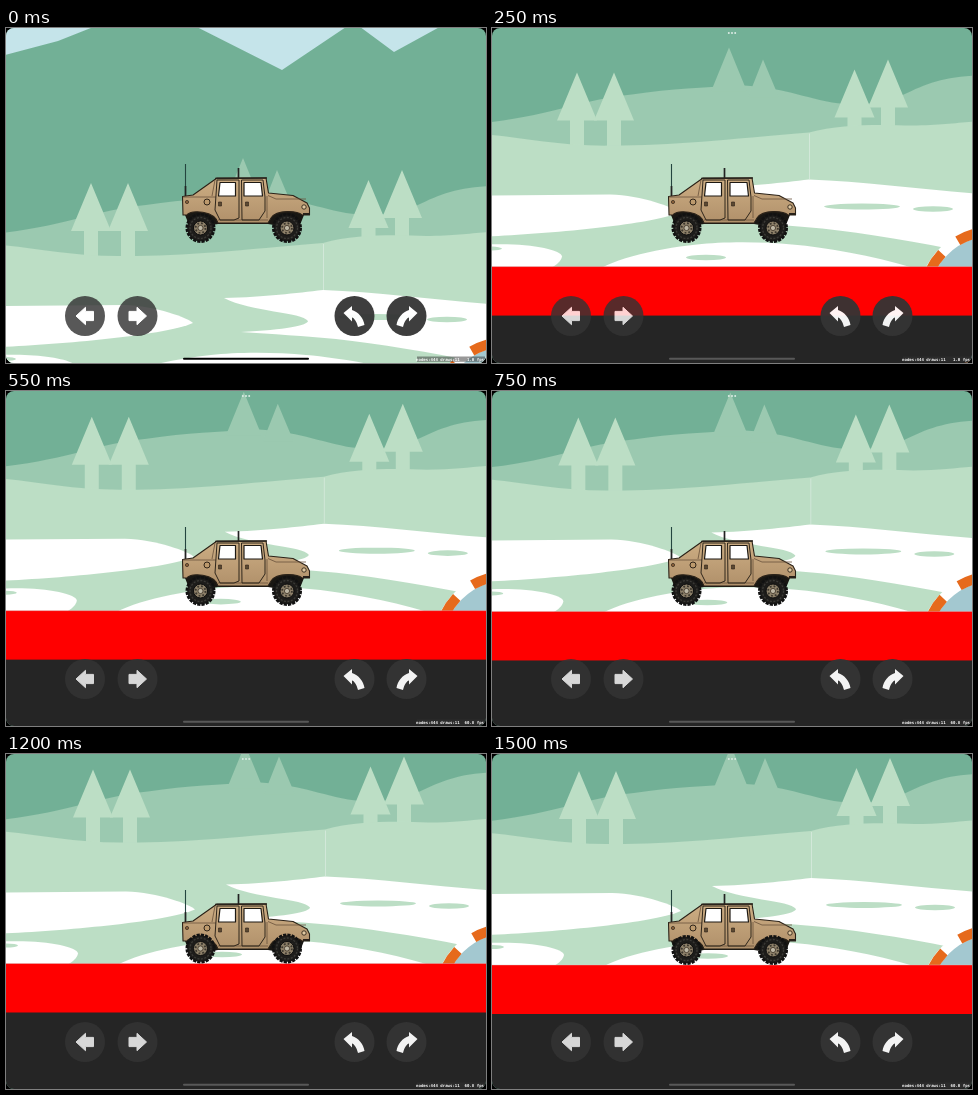
An HTML page for the animation above (1550 ms loop, 480 by 335 pixels).

```html
<!DOCTYPE html>
<html>
<head>
<meta charset="utf-8">
<style>
  html, body { margin: 0; width: 100%; height: 100%; overflow: hidden; background: #000; }
  svg { display: block; width: 480px; height: 335px; }
  #stats { font: bold 4.04px "DejaVu Sans Mono", monospace; fill: #fff; white-space: pre; }
</style>
</head>
<body>
<svg viewBox="0 0 480 335">
  <defs>
    <clipPath id="screen"><rect width="480" height="335" rx="8"/></clipPath>
    <linearGradient id="paint" x2="0" y2="1">
      <stop offset="0" stop-color="#cdae84"/>
      <stop offset="1" stop-color="#b0906a"/>
    </linearGradient>
    <path id="tree" d="M0 0L20 48H7V76H-7V48H-20Z"/>
    <g id="wheel">
      <circle r="13.300" fill="#1d1c1a"/>
      <circle r="13.700" fill="none" stroke="#111" stroke-width="2.600" stroke-dasharray="3.200 1.100"/>
      <circle r="10.500" fill="none" stroke="#3b3a36" stroke-width="1.300" stroke-dasharray="2 1.500"/>
      <circle r="7" fill="#8d8069" stroke="#0c0c0c"/>
      <circle r="4.900" fill="none" stroke="#3d372e" stroke-width="1.800" stroke-dasharray="1.800 2.050"/>
      <circle r="2.600" fill="#bdb6a3" stroke="#3b3024" stroke-width=".8"/>
    </g>
    <path id="straight" d="M-9 0L.5-8.700V-4.600H8.500V4.600H.5V8.700Z" stroke="#fff" stroke-linejoin="round"/>
    <path id="curved" d="M-11-3L-2.500-10V-6C4-4 9 2 10 9L3.500 11C2 5-.5 2-2.500 1.500V5.500Z"/>
  </defs>
  <g clip-path="url(#screen)">
    <rect width="480" height="335" fill="#72b096"/>
    <g id="world">
      <path d="M-5-120H110L52-97L-5-82ZM173-120L276-68L340-111L352-120ZM342-120L388-86L450-120Z" fill="#c5e4ea"/>
      <g fill="#9bc9b0">
        <path d="M-5 95C60 88 90 72 140 67C180 61 215 60 240 58C280 57 305 68 340 75C365 79 390 76 408 69C430 58 450 49 485 48V240H-5Z"/>
        <path d="M237 20L255 64H219ZM271 32L287 70H256Z"/>
      </g>
      <g fill="#bcdec5">
        <use href="#tree" x="85" y="45"/>
        <use href="#tree" x="122" y="45"/>
        <use href="#tree" x="362.500" y="42"/>
        <use href="#tree" x="396" y="32"/>
        <path d="M-5 107C30 110 70 119 120 118C180 118 235 112 317 105C350 96 390 97 420 98C450 98 465 95 485 94V300H-5Z"/>
      </g>
      <g fill="#fff">
        <path d="M-5 168L118 167C150 168 182 180 187 185C160 197 60 206-5 209Z"/>
        <path d="M218 160C260 159 290 155 317 152C370 154 430 162 485 166V227C430 215 375 206 330 201C300 198 265 196 235 194C280 192 302 187 302 183C296 174 245 174 218 160Z"/>
        <path d="M-5 217C35 215 70 222 70 229C68 238 55 243 35 250H-5Z"/>
        <path d="M95 250C115 232 160 222 205 217C230 214 270 214 300 217C335 220 380 228 420 240V250Z"/>
      </g>
      <g fill="#bcdec5">
        <ellipse cx="370" cy="179" rx="38" ry="3"/>
        <ellipse cx="441" cy="181.500" rx="20" ry="2.800"/>
        <ellipse cx="214" cy="230" rx="20" ry="2.800"/>
        <ellipse cx="-2" cy="221" rx="12" ry="2"/>
      </g>
      <path d="M317.500 106V152" stroke="#dcece1" stroke-width=".7"/>
      <circle cx="500" cy="272.500" r="68" fill="#a3c8d0"/>
      <g fill="none" stroke-width="10">
        <circle cx="500" cy="272.500" r="68.500" stroke="#fff"/>
        <circle cx="500" cy="272.500" r="68.500" stroke="#e66a1c" pathLength="360" stroke-dasharray="17 17" stroke-dashoffset="-2"/>
      </g>
      <rect x="-5" y="239" width="490" height="50" fill="#f00"/>
      <rect x="-5" y="288" width="490" height="160" fill="#252525"/>
      <path d="M-5 239H485" stroke="#d4c3c3" stroke-width=".4"/>
    </g>

    <g stroke-linejoin="round">
      <path d="M179.500 136V168" stroke="#24453f" stroke-width="1.100"/>
      <path d="M179.500 158V168M232.500 140V150" stroke="#222" stroke-width="1.700"/>
      <path d="M179 187C180 178 208 176 211 192H264C266 176 295 176 298 187L294 197H268L262 196H212L206 197H183Z" fill="#191713"/>
      <path d="M211 150H260L262.500 165L287 167.500L301 175L303.500 180V187H296C292 183 271 181 265 190L262 195H212C209 183 185 181 181 187H177L176.500 168.500L187 167Z" fill="url(#paint)" stroke="#2b2218" stroke-width="1.100"/>
      <path d="M209 150.500L261 150" stroke="#29231c" stroke-width="1.500"/>
      <path d="M177 169H210M262 167.500L270 171H300M261 168V190M209 152L206 168M212 192H262" fill="none" stroke="#69513a" stroke-width=".8"/>
      <path d="M211 152H233V190L228 192H214L209 182ZM235.500 152H257L259 169V183L253 192H236Z" fill="none" stroke="#2f261b"/>
      <path d="M214 154.500H229.500V168H212.500ZM238 154.500H255L256.500 168H238Z" fill="#fff" stroke="#1d1913" stroke-width="1.200"/>
      <path d="M212.500 174H215.500V178H212.500ZM239.500 174H242.500V178H239.500Z" fill="#5c4931" stroke="#2a2118" stroke-width=".6"/>
      <circle cx="201" cy="174" r="3" fill="#bd9a6d" stroke="#302519"/>
      <circle cx="181" cy="174" r="1.600" fill="#8d633c" stroke="#302519" stroke-width=".7"/>
      <circle cx="298" cy="179" r="2.200" fill="#e0c8a0" stroke="#302519" stroke-width=".9"/>
      <path d="M297 186H303.500" stroke="#272019" stroke-width="2"/>
      <g id="wheels">
        <use href="#wheel" x="194.500" y="200"/>
        <use href="#wheel" x="281" y="200"/>
      </g>
    </g>

    <g id="pads"></g>
    <rect x="177" y="329.700" width="126" height="2" rx="1" id="bar"/>
    <g id="dots" fill="#dcebe4">
      <circle cx="236.800" cy="5" r="1"/><circle cx="240" cy="5" r="1"/><circle cx="243.200" cy="5" r="1"/>
    </g>
    <rect x="411" y="328.500" width="68" height="5.300" fill="#333" opacity=".5"/>
    <text id="stats" x="478" y="333" text-anchor="end"></text>
  </g>
</svg>
<script>
const LOOP = 1550, STEP = 50;
const $ = id => document.getElementById(id);
const clamp = v => Math.min(1, Math.max(0, v));

// Ground height: seconds, y, speed. Fall, bounce, then settle on the springs.
const ground = [
  [0, 349, -368], [.294, 215.3, -542], [.365, 195, 0], [.492, 215, 97],
  [.657, 223, 0], [.822, 215, -97], [1, 206, 0], [1.2, 209.5, 10], [1.5, 211, 0]
];

function groundAt(t) {
  const i = Math.max(1, ground.findIndex(k => k[0] >= t));
  const [t0, y0, v0] = ground[i - 1], [t1, y1, v1] = ground[i];
  const h = t1 - t0, u = (t - t0) / h, w = 1 - u;
  return w * w * ((1 + 2 * u) * y0 + u * h * v0) + u * u * ((3 - 2 * u) * y1 - w * h * v1);
}

const pad = (x, icon, flip, alpha) => `
  <g transform="translate(${x} 288)" opacity="${alpha}">
    <circle r="20" fill="#343434"/>
    <use href="#${icon}" fill="#fff" transform="scale(${flip} 1)"/>
  </g>`;
$("pads").innerHTML =
  pad(79, "straight", 1, .82) + pad(131.5, "straight", -1, .82) +
  pad(348.5, "curved", 1, .95) + pad(400.5, "curved", -1, .95);

function draw(ms) {
  const t = ms / 1000, y = groundAt(t);
  const shift = 2 * clamp((t - .25) / .75);
  $("world").setAttribute("transform", `translate(${shift} ${y - 239})`);
  $("wheels").setAttribute("transform", `translate(0 ${Math.min(0, y - 215)})`);
  const lit = clamp((t - .1) / .15), grey = Math.round(88 * lit);
  $("bar").setAttribute("fill", `rgb(${grey},${grey},${grey})`);
  $("dots").setAttribute("opacity", lit);
  const fps = t < .5 ? " 1.0" : t < 1.5 ? "60.8" : "60.0";
  $("stats").textContent = `nodes:444 draws:11  ${fps} fps`;
}

const start = performance.now();
function tick() {
  const ms = (performance.now() - start) % LOOP;
  draw(Math.floor(ms / STEP) * STEP);
  requestAnimationFrame(tick);
}
tick();
</script>
</body>
</html>
```
